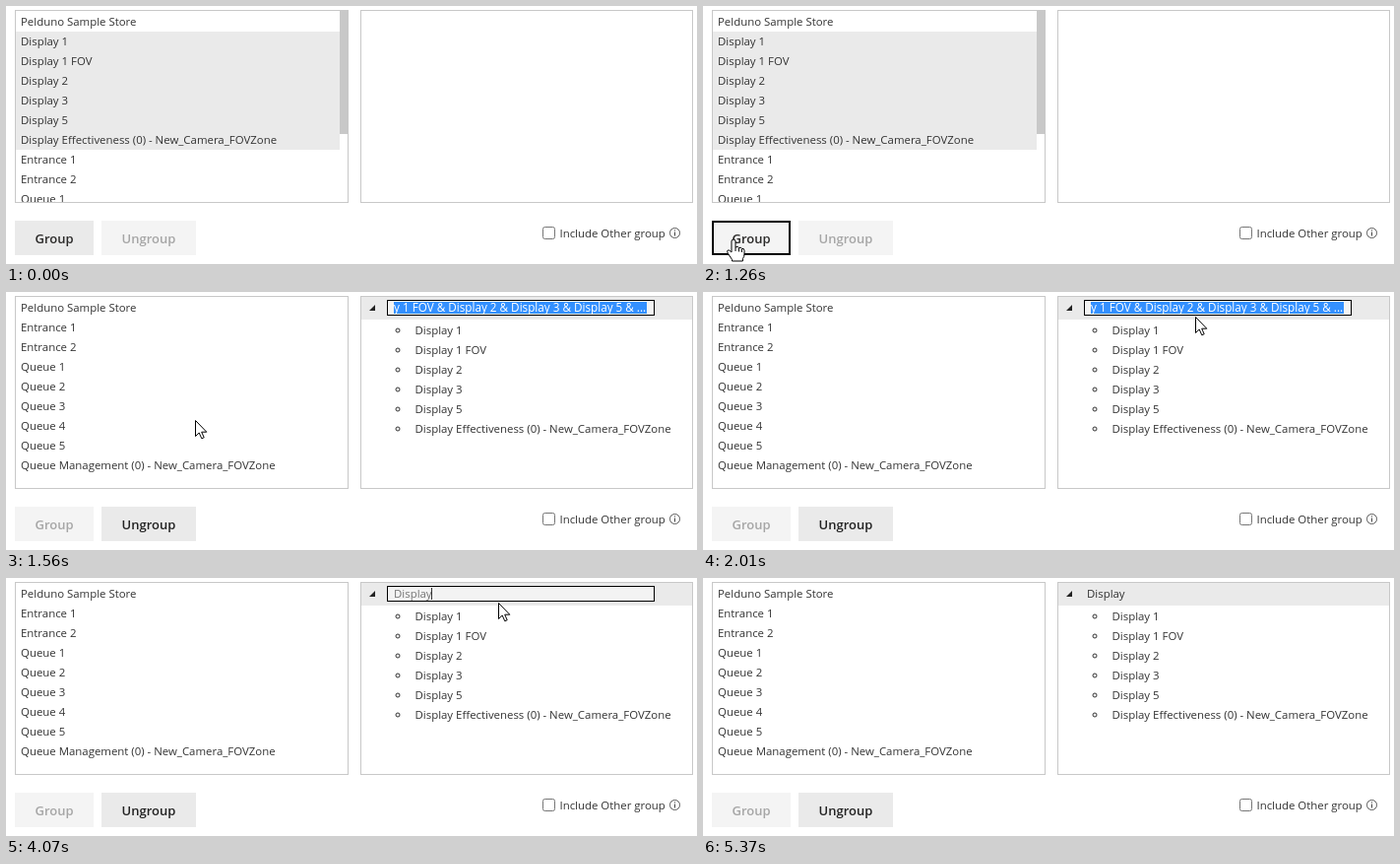
Recreate the animation shown at these times as an HTML page. Size 702 px wide and 262 px high, loop 7.23 s.

```html
<!DOCTYPE html>
<html lang="en">
<head>
<meta charset="utf-8">
<title>Grouping displays</title>
<style>
  html, body { margin: 0; width: 100%; height: 100%; overflow: hidden; background: #fff; }
  svg { display: block; width: 702px; height: 262px; }
  text { font: 11.42px "Open Sans", "Noto Sans", sans-serif; fill: #333; white-space: pre; }
  .btn { font-size: 13px; font-weight: 600; text-anchor: middle; }
  .frame { fill: none; stroke: #c8c8c8; }
  .bullet { fill: none; stroke: #333; }
  .cursor { fill: #fff; stroke: #000; stroke-linejoin: round; }
</style>
</head>
<body>
<svg viewBox="0 0 702 262">
  <defs>
    <clipPath id="listClip"><rect x="10" y="5" width="338" height="194"/></clipPath>
  </defs>

  <g id="before" clip-path="url(#listClip)">
    <rect x="10" y="26" width="329" height="120" fill="#eaeaea"/>
    <rect x="339" y="5" width="8.5" height="125" fill="#c8c8c8"/>
  </g>
  <g id="after">
    <rect x="361" y="5" width="337" height="23" fill="#eaeaea"/>
    <path d="M375 13V19H369Z" fill="#222"/>
    <g id="field">
      <rect x="387.5" y="8.5" width="271" height="15" fill="#f3f3f3" stroke="#000"/>
      <rect id="mark" x="394" y="10" width="257" height="12" fill="#3390ff"/>
    </g>
    <text id="title" y="20"></text>
    <rect id="caret" y="10" width="1" height="12" fill="#333"/>
  </g>
  <rect class="frame" x="9.5" y="4.5" width="338" height="195"/>
  <rect class="frame" x="360.5" y="4.5" width="337" height="195"/>

  <rect id="groupBox" x="9" y="218" width="80" height="35"/>
  <rect id="groupEdge" x="10" y="219" width="78" height="33" fill="none" stroke-width="2"/>
  <text id="groupText" class="btn" x="49" y="241">Group</text>
  <rect id="ungroupBox" x="97" y="218" width="96" height="35"/>
  <text id="ungroupText" class="btn" x="145" y="241">Ungroup</text>

  <rect x="545.5" y="224.5" width="12" height="12" rx="2" fill="#fff" stroke="#767676"/>
  <text x="562.5" y="235">Include Other group</text>
  <circle cx="679.5" cy="230.5" r="5" fill="none" stroke="#444" stroke-width=".9"/>
  <path d="M679.5 229.5V233.5M679.5 227.3V228.4" stroke="#444"/>

  <path id="arrow" class="cursor" d="M.5 .5V16.5L4.2 13 6.8 18.8 9.2 17.7 6.7 12.2H11.8Z"/>
  <path id="hand" class="cursor" d="M-2 2a2 2 0 0 1 4 0V8q3-1.6 3.4 .6q2.6-1 3 .8q2.6-.6 2.6 2V15q0 3-1.6 4.5V22H-1.5V20.5L-5.5 14.5q-1.6-2.6-.4-3.4q1.6-.8 3.4 1.6L-2 13ZM2 8V12M5.4 9V12.5M8.4 10V13"/>
</svg>
<script>
const LOOP = 7230, GROUPED = 1320, TYPING = 2990, COMMIT = 4720;
const $ = id => document.getElementById(id);
const NS = 'http://www.w3.org/2000/svg';

function add(parent, tag, attrs, label) {
  const el = document.createElementNS(NS, tag);
  set(el, attrs);
  if (label) el.textContent = label;
  parent.append(el);
}
function set(el, attrs) {
  for (const key in attrs) el.setAttribute(key, attrs[key]);
}
function show(id, on) {
  $(id).style.display = on ? '' : 'none';
}
function rows(parent, labels, x, y) {
  labels.forEach((label, i) => add(parent, 'text', { x, y: y + 20 * i }, label));
}

const zone = ' (0) - New_Camera_FOVZone';
const store = 'Pelduno Sample Store';
const displays = ['Display 1', 'Display 1 FOV', 'Display 2', 'Display 3', 'Display 5', 'Display Effectiveness' + zone];
const others = ['Entrance 1', 'Entrance 2', 'Queue 1', 'Queue 2', 'Queue 3', 'Queue 4', 'Queue 5', 'Queue Management' + zone];

rows($('before'), [store, ...displays, ...others.slice(0, 3)], 15, 20);
rows($('after'), [store, ...others], 15, 20);
rows($('after'), displays, 415.5, 43);
displays.forEach((_, i) => add($('after'), 'circle', { class: 'bullet', cx: 398, cy: 39 + 20 * i, r: 2 }));

// Pointer samples: time, x, y, shape
const pointer = [
  [0, 0, 0, ''],
  [70, 141, 250, 'arrow'], [150, 112, 248, 'arrow'], [230, 76, 245, 'hand'], [300, 42, 242, 'hand'],
  [380, 22, 240, 'hand'], [530, 24, 239, 'hand'], [610, 26, 238, 'hand'], [1260, 31, 237, 'hand'],
  [1320, 32, 236, 'arrow'], [1400, 54, 222, 'arrow'], [1480, 112, 184, 'arrow'], [1550, 192, 130, 'arrow'],
  [1630, 285, 74, 'arrow'], [1700, 362, 32, 'arrow'], [1780, 424, 7, 'arrow'], [1850, 458, 0, 'arrow'],
  [1930, 478, 6, 'arrow'], [2010, 500, 25, 'arrow'],
  [5370, 0, 0, '']
];
const keys = [2990, 3220, 3370, 3540, 3670, 3920, 4070];

function drawPointer(t) {
  const [, x, y, shape] = pointer.filter(p => p[0] <= t).pop();
  for (const id of ['arrow', 'hand']) show(id, shape === id);
  if (shape) set($(shape), { transform: `translate(${x} ${y})` });
}

function paint(name, box, ink) {
  $(name + 'Box').style.fill = box;
  $(name + 'Text').style.fill = ink;
}

function drawButtons(t) {
  const edge = t < 1260 ? 'none' : t < GROUPED ? '#000' : t < 1400 ? '#666' : 'none';
  set($('groupEdge'), { stroke: edge });
  if (t < GROUPED) {
    paint('group', t < 230 ? '#eaeaea' : '#f4f4f4', '#2b2a29');
    paint('ungroup', '#f4f4f4', '#a6a6a6');
  } else if (t < 1400) {
    paint('group', '#f4f4f4', '#4a4a4a');
    paint('ungroup', '#efefef', '#666');
  } else {
    paint('group', '#f4f4f4', '#a6a6a6');
    paint('ungroup', '#eaeaea', '#222');
  }
}

function drawTitle(t) {
  const title = $('title');
  const selected = t < TYPING, done = t >= COMMIT;
  const typed = 'Display'.slice(0, keys.filter(k => k <= t).length);
  title.textContent = selected ? 'y 1 FOV & Display 2 & Display 3 & Display 5 & ...' : typed;
  title.style.fill = selected ? '#fff' : done ? '#333' : '#767676';
  title.style.fontSize = selected ? '11.7px' : '';
  set(title, { x: done ? 390 : 394 });
  show('field', !done);
  show('mark', selected);
  const blink = !selected && t < 4570;
  show('caret', blink);
  if (blink) set($('caret'), { x: Math.floor(394 + title.getComputedTextLength()) });
}

function draw(t) {
  const grouped = t >= GROUPED;
  show('before', !grouped);
  show('after', grouped);
  if (grouped) drawTitle(t);
  drawButtons(t);
  drawPointer(t);
}

const start = performance.now();
function tick() {
  draw((performance.now() - start) % LOOP);
  requestAnimationFrame(tick);
}
tick();
</script>
</body>
</html>
```
